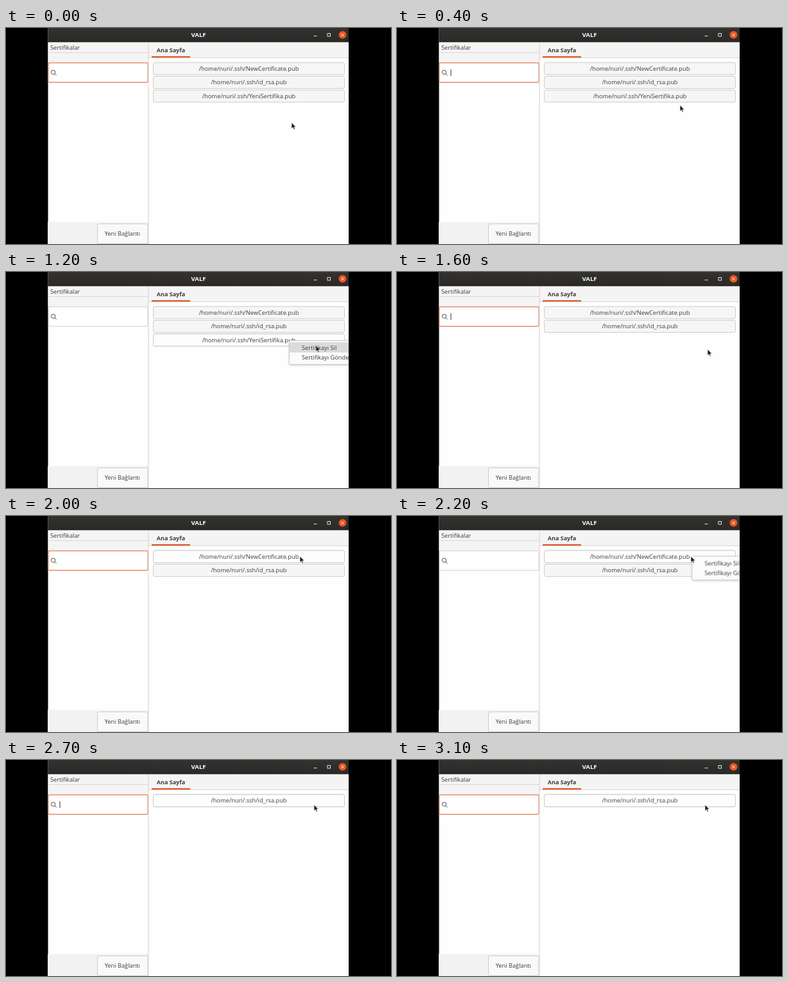
Recreate the animation shown at these times as an HTML page. Size 600 by 338 pixels, loop 3300 ms.

```html
<!DOCTYPE html>
<html lang="tr">
<head>
<meta charset="utf-8">
<title>VALF</title>
<style>
  html, body { margin: 0; width: 100%; height: 100%; overflow: hidden; background: #000; }
  svg { display: block; width: 100vw; height: 100vh; }
  text { font: 9.25px "Open Sans", "Noto Sans", sans-serif; fill: #3d3d3d; }
  .bold { font-weight: 700; }
  .mid { text-anchor: middle; }
  .line { stroke: #dcd9d6; }
  .btn rect { fill: #f7f6f6; stroke: #cfcac6; }
  .btn .hot { fill: #fdfdfd; }

  /* one loop is 33 ticks of 100 ms; everything jumps on a tick */
  .anim { animation: 3300ms step-end infinite; }
  #pointer { animation-name: move; }
  #menu { animation-name: menu; filter: drop-shadow(0 1px 1.5px #0003); }
  #pick { animation-name: pick; }
  #focus { animation-name: focus; }
  #caret { animation-name: caret; }
  #first { animation-name: first; }
  #second { animation-name: second; }
  #third { animation-name: third; }
  #first .hot { animation-name: hot1; }
  #second .hot { animation-name: hot2; }
  #third .hot { animation-name: hot3; }

  @keyframes move {
    0% { transform: translate(445px, 148px); animation-timing-function: steps(6); }
    18.18% { transform: translate(439px, 107px); }
    24.24% { transform: translate(439px, 107px); animation-timing-function: steps(4); }
    36.36% { transform: translate(483px, 115px); }
    39.39% { transform: translate(484px, 121px); }
    48.48% { transform: translate(484px, 121px); animation-timing-function: steps(4); }
    60.6% { transform: translate(458px, 63px); }
    66.66% { transform: translate(458px, 63px); animation-timing-function: steps(2); }
    72.72%, 100% { transform: translate(480px, 70px); }
  }
  @keyframes menu {
    0% { opacity: 0; transform: none; }
    21.21% { opacity: 1; transform: none; }
    45.45% { opacity: 0; transform: none; }
    63.63% { opacity: 1; transform: translate(18.3px, -44.5px); }
    81.81%, 100% { opacity: 0; transform: none; }
  }
  @keyframes pick {
    0%, 45.45% { opacity: 0; }
    30.3%, 69.69% { opacity: 1; }
    81.81%, 100% { opacity: 0; }
  }
  @keyframes focus {
    0%, 45.45% { opacity: 1; }
    21.21%, 63.63% { opacity: 0; }
    81.81%, 100% { opacity: 1; }
  }
  @keyframes caret {
    0%, 15.15%, 57.57% { opacity: 0; }
    3.03%, 45.45%, 81.81% { opacity: 1; }
    93.93%, 100% { opacity: 0; }
  }
  @keyframes first { 0% { opacity: 1; } 81.81%, 100% { opacity: 0; } }
  @keyframes second { 0% { transform: none; } 81.81%, 100% { transform: translateY(-21.5px); } }
  @keyframes third { 0% { opacity: 1; } 45.45%, 100% { opacity: 0; } }
  @keyframes hot1 { 0% { opacity: 0; } 60.6%, 100% { opacity: 1; } }
  @keyframes hot2 { 0%, 60.6% { opacity: 0; } 54.54%, 81.81%, 100% { opacity: 1; } }
  @keyframes hot3 { 0% { opacity: 0; } 15.15%, 100% { opacity: 1; } }
</style>
</head>
<body>
<svg viewBox="0 0 600 338" preserveAspectRatio="none">
  <defs>
    <clipPath id="frame"><rect x="65.5" width="468.5" height="338"/></clipPath>
    <linearGradient id="bar" x2="0" y2="1">
      <stop stop-color="#34322f"/><stop offset="1" stop-color="#2b2927"/>
    </linearGradient>
  </defs>
  <rect width="600" height="338"/>
  <g clip-path="url(#frame)">
    <rect x="65" width="470" height="338" fill="#fefefe"/>

    <!-- title bar -->
    <rect x="65" width="470" height="22.5" fill="url(#bar)"/>
    <text class="bold mid" x="300" y="14.4" style="fill:#fff;font-size:9.6px">VALF</text>
    <g fill="none" stroke="#e4e2df">
      <path d="M479.5 12.5h5"/>
      <rect x="501" y="8.5" width="4.5" height="4.5"/>
    </g>
    <circle cx="524.5" cy="10.8" r="6" fill="#e95420"/>
    <path d="M522.3 8.6l4.4 4.4m0-4.4l-4.4 4.4" stroke="#fff"/>

    <!-- sidebar -->
    <rect x="65" y="22.5" width="157" height="32" fill="#f5f4f4"/>
    <path class="line" d="M65 38.5h157"/>
    <text x="69" y="33.8">Sertifikalar</text>
    <rect x="66" y="54.5" width="155" height="30.5" rx="2" fill="#fff" stroke="#d3cec9"/>
    <rect id="focus" class="anim" x="66" y="54.5" width="155" height="30.5" rx="2" fill="#fff" stroke="#e58e6f" stroke-width="1.3"/>
    <g fill="none" stroke="#4a4a4a">
      <circle cx="73.6" cy="69.3" r="3.2"/>
      <path d="M75.9 71.6l2.8 2.8"/>
    </g>
    <path id="caret" class="anim" d="M84 64.5v10.5" stroke="#333"/>
    <rect x="65" y="303.5" width="157" height="35" fill="#f3f2f2"/>
    <g class="btn">
      <rect x="142.5" y="306.5" width="78.5" height="31" rx="2.5" style="fill:#faf9f9"/>
      <text class="mid" x="181.3" y="325.4">Yeni Bağlantı</text>
    </g>

    <!-- tabs -->
    <rect x="222" y="22.5" width="313" height="24" fill="#f5f4f4"/>
    <path class="line" d="M222 46.5h313"/>
    <path d="M222 22.5v316" stroke="#d3cfcb"/>
    <rect x="227" y="44" width="60" height="2.5" fill="#dd6339"/>
    <text class="bold mid" x="257" y="37.9" style="font-size:9px">Ana Sayfa</text>

    <!-- certificates -->
    <g id="first" class="btn anim">
      <rect x="229.5" y="54" width="298" height="19" rx="2.5"/>
      <rect class="hot anim" x="229.5" y="54" width="298" height="19" rx="2.5"/>
      <text class="mid" x="378.5" y="66.8">/home/nuri/.ssh/NewCertificate.pub</text>
    </g>
    <g id="second" class="btn anim">
      <rect x="229.5" y="75.5" width="298" height="19" rx="2.5"/>
      <rect class="hot anim" x="229.5" y="75.5" width="298" height="19" rx="2.5"/>
      <text class="mid" x="378.5" y="88.3">/home/nuri/.ssh/id_rsa.pub</text>
    </g>
    <g id="third" class="btn anim">
      <rect x="229.5" y="97" width="298" height="19" rx="2.5"/>
      <rect class="hot anim" x="229.5" y="97" width="298" height="19" rx="2.5"/>
      <text class="mid" x="378.5" y="109.8">/home/nuri/.ssh/YeniSertifika.pub</text>
    </g>

    <!-- context menu -->
    <g id="menu" class="anim">
      <rect x="441.5" y="107.5" width="110" height="37" rx="2" fill="#fbfbfb" stroke="#d0ccc8"/>
      <rect id="pick" class="anim" x="442" y="110" width="109" height="16" fill="#dcdbda"/>
      <text x="461" y="121.5">Sertifikayı Sil</text>
      <text x="461" y="137.4">Sertifikayı Gönder</text>
    </g>

    <g id="pointer" class="anim">
      <path d="M0 0v9.6l2.2-2 1.5 3.4 1.6-.7-1.5-3.3h3z" fill="#1c1c1c" stroke="#fff" stroke-width=".6"/>
    </g>
  </g>
</svg>
</body>
</html>
```
